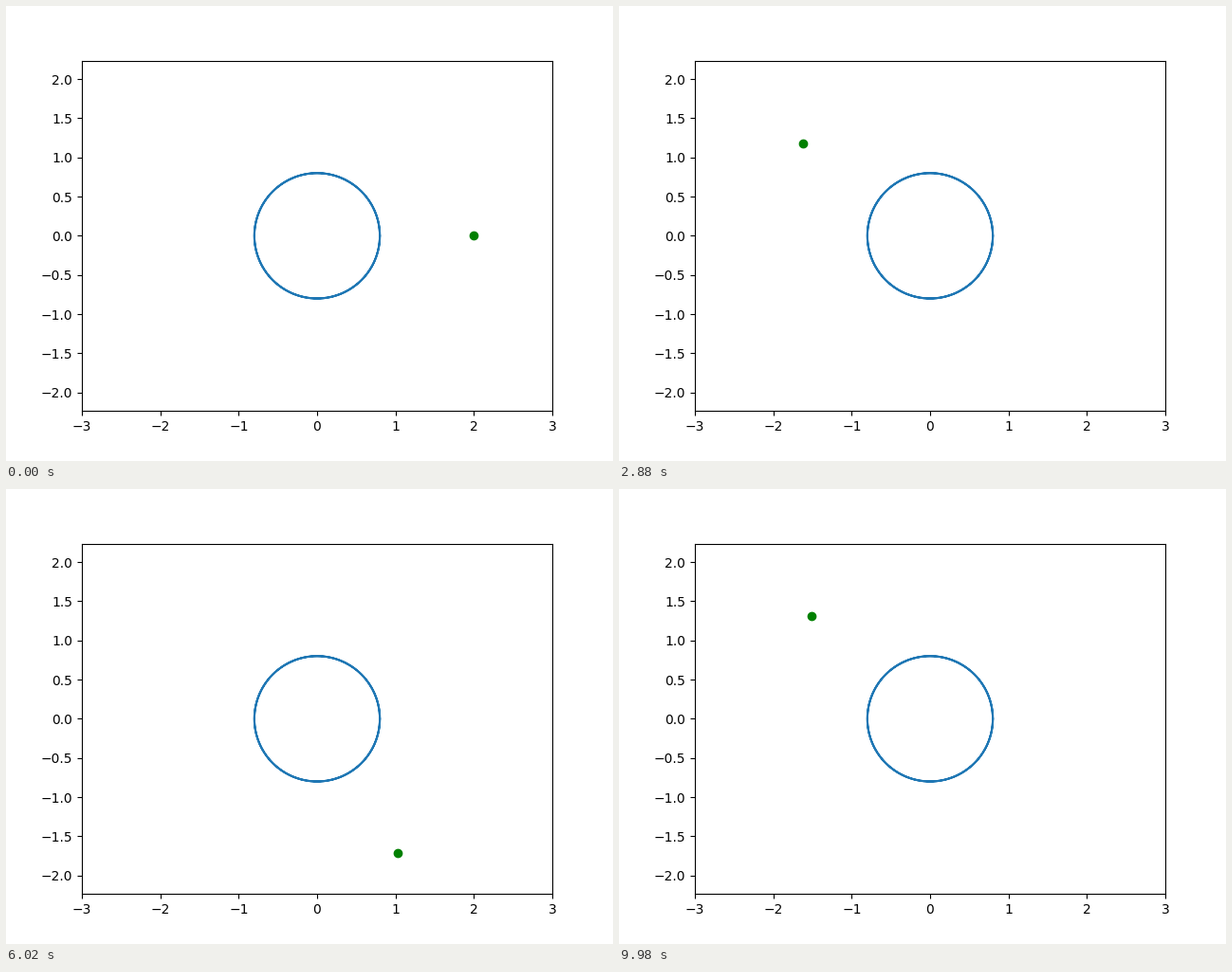
Animation, 640 px wide and 480 px high, one loop 10000 ms. Source, as a matplotlib script:

```python
import numpy as np
import matplotlib.pyplot as plt
from matplotlib.animation import FuncAnimation

FRAMES = 500
INTERVAL = 20
ORBIT = 2.0
RADIUS = 0.8

plt.rcParams["font.family"] = "DejaVu Sans"
fig, ax = plt.subplots(figsize=(6.4, 4.8), dpi=100)

# Equal scale on both axes: the plot area is 496 by 369.6 pixels.
half_width = 3
half_height = half_width * 369.6 / 496
ax.set_xlim(-half_width, half_width)
ax.set_ylim(-half_height, half_height)

# Two turns over the same outline give it a firm edge.
theta = np.radians(np.arange(721))
ax.plot(RADIUS * np.cos(theta), RADIUS * np.sin(theta))
dot, = ax.plot([ORBIT], [0], "o", color="green")


def update(frame):
    """Move the dot one degree per frame."""
    angle = np.radians(frame)
    dot.set_data([ORBIT * np.cos(angle)], [ORBIT * np.sin(angle)])
    return dot,


anim = FuncAnimation(fig, update, frames=FRAMES, interval=INTERVAL,
                     blit=True, repeat=True, repeat_delay=0)
plt.show()
```
